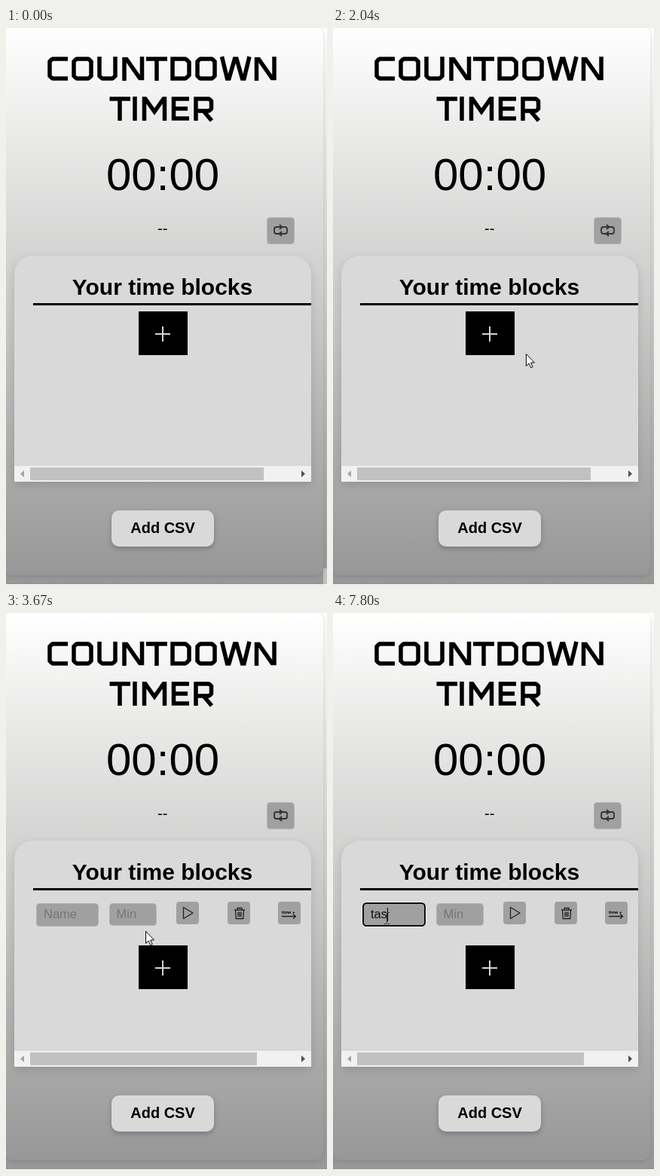
Write an HTML page that moves like this. It is 426 px wide and 739 px high and loops after 8 s.

```html
<!DOCTYPE html>
<html lang="en">
<head>
<meta charset="utf-8">
<title>Countdown timer</title>
<style>
html, body { margin: 0; width: 100%; height: 100%; overflow: hidden; background: #fff; }
svg { display: block; width: 426px; height: 739px; font-family: "Liberation Sans", Arial, sans-serif; }
text { white-space: pre; }
.bold { font-weight: bold; }
.field { font-size: 16.5px; }
.hint { fill: #757575; }
.card { filter: drop-shadow(0 1px 3px rgba(0,0,0,.14)); }
.panel { filter: drop-shadow(0 4px 6px rgba(0,0,0,.13)); }
.csv { filter: drop-shadow(0 3px 3px rgba(70,80,100,.45)); }
.icon { fill: none; stroke: #222; stroke-width: 1.3; stroke-linejoin: round; }
.title { fill: none; stroke: #000; stroke-width: 5.5; stroke-miterlimit: 2; }
.btn { fill: #a0a0a0; stroke: #b4b4b4; }

/* One loop is 8 s, so 1% is 80 ms */
.step { animation: 8s step-end infinite; }
.off { visibility: hidden; }
.corner { animation-name: corner; }
.row { animation-name: row; }
.add { animation-name: add; }
.thumb { animation-name: thumb; }
.focus { animation-name: focus; }
.name { animation-name: name; }
.caret { animation-name: caret; }
.t { animation-name: t; }
.a { animation-name: a; }
.s { animation-name: s; }
.click { animation-name: click; }
.arrow { animation-name: arrow; }
.beam { animation-name: beam; }
.pointer { animation: move 8s linear infinite; }

@keyframes corner { 0% { visibility: visible } 1%, 100% { visibility: hidden } }
@keyframes row { 0% { visibility: hidden } 41.75%, 100% { visibility: visible } }
@keyframes add { 0% { transform: none } 41.75%, 100% { transform: translateY(65px) } }
@keyframes thumb {
  0% { width: 310px; fill: #c1c1c1 }
  18.75% { width: 310px; fill: #a8a8a8 }
  19.25% { width: 310px; fill: #c1c1c1 }
  41.75%, 100% { width: 301px; fill: #c1c1c1 }
}
@keyframes focus { 0% { visibility: hidden } 54.25%, 100% { visibility: visible } }
@keyframes name {
  0% { visibility: hidden }
  41.75% { visibility: visible }
  90.875%, 100% { visibility: hidden }
}
@keyframes caret {
  0% { visibility: hidden; transform: none }
  54.25% { visibility: visible; transform: none }
  61% { visibility: hidden; transform: none }
  67.375% { visibility: visible; transform: none }
  74.125% { visibility: hidden; transform: none }
  80.375% { visibility: visible; transform: none }
  87.125% { visibility: hidden; transform: none }
  90.875% { visibility: visible; transform: translateX(4px) }
  95.125% { visibility: visible; transform: translateX(13px) }
  97.5%, 100% { visibility: visible; transform: translateX(22px) }
}
@keyframes t { 0% { visibility: hidden } 90.875%, 100% { visibility: visible } }
@keyframes a { 0% { visibility: hidden } 95.125%, 100% { visibility: visible } }
@keyframes s { 0% { visibility: hidden } 97.5%, 100% { visibility: visible } }
@keyframes click {
  0% { visibility: hidden }
  39.625% { visibility: visible }
  41.375% { visibility: hidden }
  53.875% { visibility: visible }
  55.125%, 100% { visibility: hidden }
}
@keyframes arrow {
  0% { visibility: hidden }
  13.25% { visibility: visible }
  49.25%, 100% { visibility: hidden }
}
@keyframes beam { 0% { visibility: hidden } 49.25%, 100% { visibility: visible } }
@keyframes move {
  0%, 13.25% { transform: translate(420px, 726px) }
  18.5% { transform: translate(340px, 607px) }
  23%, 23.5% { transform: translate(278px, 469px) }
  25.5% { transform: translate(256px, 432px); animation-timing-function: ease-out }
  33.25% { transform: translate(207px, 417px) }
  33.625% { transform: translate(201px, 415px) }
  34%, 36.625% { transform: translate(206px, 419px) }
  37.25% { transform: translate(200px, 407px) }
  37.875%, 43.75% { transform: translate(205px, 399px) }
  46% { transform: translate(184px, 423px) }
  49.25% { transform: translate(116px, 411px) }
  51% { transform: translate(80px, 400px) }
  51.75%, 100% { transform: translate(71px, 405px) }
}
</style>
</head>
<body>
<svg viewBox="0 0 426 739">
  <defs>
    <linearGradient id="shade" x1="0" y1="0" x2="0" y2="1">
      <stop offset="0" stop-color="#fff"/>
      <stop offset=".19" stop-color="#ebebea"/>
      <stop offset="1" stop-color="#979797"/>
    </linearGradient>
  </defs>

  <rect width="426" height="738" fill="url(#shade)"/>
  <rect class="step corner" x="421" y="717" width="5" height="21" fill="#c1c1c1"/>
  <rect class="card" x="-2" y="-1" width="423" height="727" rx="10" fill="url(#shade)"/>

  <g class="title" role="img" aria-label="Countdown timer">
    <path d="M82 41H62Q61 41 58 44.500V63.500Q61 67 62 67H82"/>
    <path id="o" d="M94 41H109Q110 41 113 44.500V63.500Q110 67 109 67H94Q93 67 90 63.500V44.500Q93 41 94 41Z"/>
    <path d="M124 38V63.500Q127 67 128 67H141Q142 67 145 63.500V38"/>
    <path id="n" d="M157 70V41.500H160L177.500 66.500H180.500V38"/>
    <path d="M186 41H214M200 41V70"/>
    <path d="M221 41H238Q239 41 243 45.500V62.500Q239 67 238 67H221Z"/>
    <use href="#o" x="164"/>
    <path d="M286.500 38L293.500 67H296L303.500 41H306L313.500 67H316L323 38"/>
    <use href="#n" x="175.500"/>
    <path d="M137.500 94H165M151 94V123M171 91V123"/>
    <path d="M183.500 123V94H185L197 111L209 94H210.500V123"/>
    <path d="M243 94H222.500V120H243M222.500 107H241"/>
    <path d="M252 123V94H269Q270 94 272.500 97V107Q270 110 269 110H252M262 110L273 123"/>
  </g>

  <text x="133" y="215" font-size="60">00:00</text>
  <text x="201" y="273" font-size="20">--</text>

  <rect class="btn" x="346.5" y="251.5" width="36" height="35" rx="4"/>
  <g class="icon" style="stroke: #333; stroke-width: 1.8">
    <path id="turn" d="M362 273H359Q356 273 356 270V267Q356 264 359 264H366M363 261L366.500 264L363 267"/>
    <use href="#turn" transform="rotate(180 364.5 268.5)"/>
  </g>

  <path class="panel" d="M11 602V327A25 25 0 0 1 36 302H380A25 25 0 0 1 405 327V602Z" fill="#d9d9d9"/>
  <text class="bold" x="207.5" y="354" font-size="30" text-anchor="middle">Your time blocks</text>
  <rect x="36" y="365" width="369" height="3"/>

  <rect x="11" y="581" width="394" height="21" fill="#f1f1f1"/>
  <rect class="step thumb" x="32" y="583" width="310" height="17" fill="#c1c1c1"/>
  <path d="M24 587V596L19 591.5Z" fill="#a3a3a3"/>
  <path d="M392 587V596L397 591.5Z" fill="#505050"/>

  <g class="step add">
    <rect x="176" y="376" width="65" height="58"/>
    <path d="M198 406H218M208 396V416" stroke="#d4d4d4" stroke-width="2"/>
  </g>

  <g class="step row off">
    <rect class="btn" x="40.5" y="385.5" width="82" height="30" rx="4"/>
    <rect class="btn" x="137.5" y="385.5" width="62" height="29" rx="4"/>
    <text class="field hint" x="146.5" y="405">Min</text>

    <rect class="btn" stroke-width="0" x="226" y="383" width="30" height="30" rx="4"/>
    <path class="icon" d="M235.5 390.5V405.5L248 398Z"/>

    <rect class="btn" stroke-width="0" x="294" y="383" width="30" height="30" rx="4"/>
    <path class="icon" d="M303 394H317M307 394V391.5H313V394M304.5 394L305.2 405.5H314.8L315.5 394M308 396.5V403M310 396.5V403M312 396.5V403"/>

    <rect class="btn" stroke-width="0" x="361" y="383" width="30" height="30" rx="4"/>
    <text class="bold" x="366" y="399" font-size="6">time +</text>
    <path class="icon" d="M366 402.5H384.5M381 399.5L384.5 402.5L381 405.5"/>
  </g>

  <g class="step focus off" fill="none">
    <rect x="38.5" y="383.5" width="85" height="33" rx="6" stroke="#f4f4f4"/>
    <rect x="40" y="385" width="82" height="30" rx="4.5" stroke="#101010" stroke-width="2" fill="#a0a0a0"/>
  </g>
  <text class="field hint step name off" x="50" y="405">Name</text>
  <text class="field" x="50" y="405" fill="#111"><tspan class="step t off">t</tspan><tspan class="step a off">a</tspan><tspan class="step s off">s</tspan></text>
  <rect class="step caret off" x="50" y="391" width="1" height="18"/>

  <rect class="csv" x="140" y="640" width="136" height="48" rx="10" fill="#d9d9d9"/>
  <text class="bold" x="208" y="670" font-size="20" text-anchor="middle">Add CSV</text>

  <g class="pointer">
    <path class="step arrow off" d="M.5 .5V16.5L4.2 13L6.8 18.8L9.2 17.7L6.7 12H11.5Z" fill="#fff" stroke="#000"/>
    <path class="step beam off" d="M-3 -7.5H-.5M1.5 -7.5H4M.5 -7V7M-3 7.5H-.5M1.5 7.5H4" fill="none" stroke="#333"/>
    <circle class="step click off" r="15" fill="#fff000" fill-opacity=".5"/>
  </g>
</svg>
</body>
</html>
```
